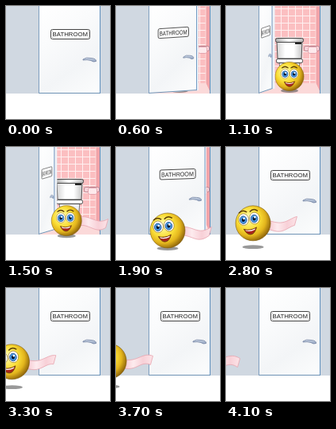
Animation of 131 by 142 pixels, one loop 4.2 s. Source, as an HTML page with a canvas:

```html
<!DOCTYPE html>
<html lang="en">
<head>
<meta charset="utf-8">
<title>Bathroom door</title>
<style>
html, body { margin: 0; width: 100%; height: 100%; overflow: hidden; background: #fff; }
canvas { display: block; }
</style>
</head>
<body>
<canvas id="stage" width="131" height="142"></canvas>
<script>
const c = document.getElementById('stage').getContext('2d');
const LOOP = 4200, STEP = 100;
const LEFT = 41, RIGHT = 119, FLOOR = 110;
const { PI, sin, cos, min, max } = Math;

const ramp = (t, from, to) => min(1, max(0, (t - from) / (to - from)));

// The door swings in evenly and falls shut with growing speed.
const doorAngle = t => 77 * PI / 180 * min(ramp(t, 200, 1000), 1 - ramp(t, 1400, 2000) ** 2);

// The ball comes out of the room, then floats off to the left in long strides.
function ballPose(t) {
  const out = ramp(t, 1100, 1900) ** 2;
  const s = max(0, t - 1900) / 1000;
  return {
    x: 80 - 15 * out - (30 * s + 7 * s * s + 3 * sin(2 * PI * s)),
    y: 88.5 + 16.5 * out - 13 * sin(PI * s / 3.6),
    r: 18.3 + 4 * out,
    ground: 106.5 + 21 * out - 2 * s,
    turn: out
  };
}

function paint(fill, stroke, width = 1, shape) {
  const args = shape ? [shape] : [];
  if (fill) { c.fillStyle = fill; c.fill(...args); }
  if (stroke) { c.strokeStyle = stroke; c.lineWidth = width; c.stroke(...args); }
}

function box(x, y, w, h, fill) {
  c.fillStyle = fill;
  c.fillRect(x, y, w, h);
}

function oval(x, y, rx, ry, fill, stroke, width) {
  c.beginPath();
  c.ellipse(x, y, rx, ry, 0, 0, PI * 2);
  paint(fill, stroke, width);
}

function rounded(x, y, w, h, r, fill, stroke) {
  c.beginPath();
  c.roundRect(x, y, w, h, r);
  paint(fill, stroke);
}

const path = (d, fill, stroke, width) => paint(fill, stroke, width, new Path2D(d));

function addStops(g, colors) {
  colors.forEach((color, i) => g.addColorStop(i / (colors.length - 1), color));
  return g;
}

const gradient = (x0, y0, x1, y1, ...colors) =>
  addStops(c.createLinearGradient(x0, y0, x1, y1), colors);

function room() {
  box(LEFT, 0, RIGHT - LEFT, FLOOR, '#fbbfc1');
  for (let x = LEFT + 1; x < 113; x += 9) box(x, 0, 1, 97, '#fff0f0');
  for (let y = 3; y < 97; y += 9) box(LEFT, y, 72, 1, '#fff0f0');
  path('M41 97H113L119 110H41Z', '#fbd9d9');
  path('M113 0H119V110L113 97Z', '#f2a3a8', '#fbdcdc');

  // paper holder
  rounded(98.5, 50.5, 19, 6, 2, '#f8d3d9', '#b98590');
  rounded(103.5, 51.5, 11, 8, 2, '#fde9ec', '#e3a3ad');

  // toilet
  path('M67 70H93L90 100H70Z', '#eef0f2', '#777');
  path('M64 45H96L95 66H65Z', gradient(64, 0, 96, 0, '#d5d5d5', '#fff', '#fff', '#c5c5c5'), '#555');
  rounded(62.5, 40.5, 35, 5, 2, gradient(62, 0, 97, 0, '#aaa', '#fff', '#bbb'), '#444');
  box(87, 46, 8, 2, '#222');
  rounded(63.5, 66.5, 33, 5, 2, '#f6f6f6', '#444');
}

function door(angle) {
  const w = RIGHT - LEFT;
  c.save();
  c.transform(cos(angle), -.08 * sin(angle), 0, 1, LEFT, 0);
  box(0, -10, w, FLOOR + 10, gradient(0, 0, w, FLOOR, '#fff', '#fafbfc', '#f3f5f7', '#fcfdfd'));
  box(0, FLOOR - 1, w, 1, '#6f93b5');

  rounded(15.5, 29.5, 49, 12, 2, '#fff', '#444');
  for (const x of [17, 62]) for (const y of [31, 39]) box(x, y, 1, 1, '#aaa');
  c.fillStyle = '#222';
  c.font = '7.8px "Liberation Sans", Arial, sans-serif';
  c.textAlign = 'center';
  c.fillText('BATHROOM', 39.8, 38.4);

  path('M56 67Q60 64 66 65.5Q73 66 72.5 69.5Q69 71 66 68.5Q61 67 56 68Z',
    gradient(0, 64, 0, 71, '#dfe7f2', '#7f93b5'), '#7585a3', .8);
  c.restore();

  // free edge of the leaf
  const edge = LEFT + w * cos(angle), rise = .08 * w * sin(angle);
  box(edge, 0, 3 * sin(angle), FLOOR - rise, '#eef3f8');
  box(edge - 1, 0, 1, FLOOR - rise, '#6f9ac4');
}

function paper(x, y, from, to, t) {
  const top = [], bottom = [];
  for (let u = 0; u <= 1; u += 1 / 16) {
    const px = x + from + (to - from) * u;
    const py = y + 2 + 5 * (.3 + .7 * u) * sin(4.5 * u + (t - 2800) / 800);
    top.push(`${px} ${py - 5.5}`);
    bottom.unshift(`${px - 3 * u} ${py + 5.5}`);
  }
  path('M' + top.concat(bottom).join('L') + 'Z',
    gradient(x + from, 0, x + to, 0, '#f6c6cf', '#fdebee', '#f8d0d7', '#fce4e8'), '#e8a4ae', .8);
}

function face(turn) {
  c.translate(-4.5 * turn, -1.5 * turn);
  c.rotate(-.12 * turn);
  for (const side of [-1, 1]) {
    const x = side * 6.8, iris = x - turn * .4;
    oval(x, -4, 6.3, 7.2, '#fff', '#8a6a14', .6);
    oval(iris, -3.5, 4.2, 4.7, '#4a9ae6', '#1b4c8c', .8);
    oval(iris, -3.5, 2, 2.4, '#07152b');
    oval(iris + 1, -5.2, 1.3, 1.3, '#fff');
    path(`M${x - 5} -12.5Q${x} -17 ${x + 5} -12.5`, null, '#5b3d06', 1.5);
  }
  path('M-8 8Q0 11.5 8 7.5Q5 15.5 0 15.5Q-5 15.5 -8 8Z', '#a8251b', '#65400a', .8);
  path('M-6.5 9Q0 11.5 6.5 8.7L5.5 10.3Q0 12.5 -5.5 10.5Z', '#fff');
}

function ball({ x, y, r, ground, turn }, t, withPaper) {
  oval(x, ground, r * .6, 2.4, 'rgba(70,70,70,.55)');
  if (withPaper) paper(x, y, r - 4, r + 33, t);
  c.save();
  c.translate(x, y);
  c.scale(r / 22, r / 22);
  const skin = c.createRadialGradient(-7, -7, 1, -4, -4, 27);
  addStops(skin, ['#fffcc4', '#fdee70', '#f9dc35', '#e3b51d', '#8f650a']);
  oval(0, 0, 21.7, 21.7, skin, '#7d5a0c', .6);
  face(turn);
  c.restore();
}

function draw(t) {
  const angle = doorAngle(t), pose = ballPose(t), outside = t >= 1500;
  c.clearRect(0, 0, 131, 142);
  box(0, 0, 131, FLOOR, '#d0d8e1');
  if (angle > 0) {
    c.save();
    c.beginPath();
    c.rect(LEFT, 0, RIGHT - LEFT, FLOOR);
    c.clip();
    room();
    c.restore();
    if (!outside) ball(pose, t, false);
  }
  door(angle);
  box(LEFT, 0, 1, FLOOR, '#7f9fc0');
  box(RIGHT - 1, 0, 1, FLOOR, '#5f8fbd');
  if (outside) ball(pose, t, true);
}

function tick() {
  const t = performance.now() % LOOP;
  draw(Math.floor(t / STEP) * STEP);
  requestAnimationFrame(tick);
}
tick();
</script>
</body>
</html>
```
